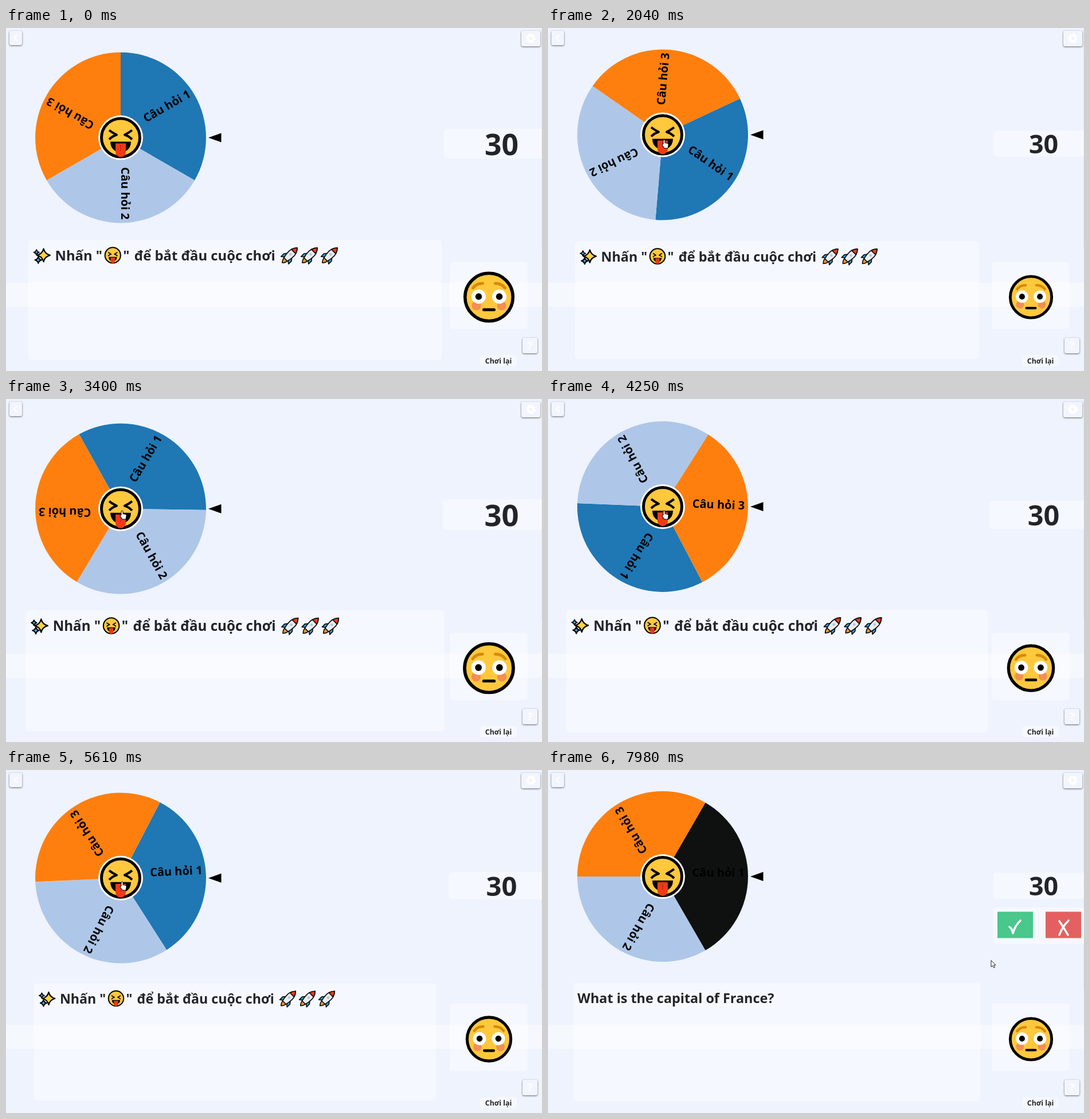
Recreate the animation shown at these times as an HTML page. Size 935 px wide and 599 px high, loop 8000 ms.

```html
<!DOCTYPE html>
<html lang="vi">
<head>
<meta charset="utf-8">
<title>Vòng quay câu hỏi</title>
<style>
  html, body { margin: 0; width: 100%; height: 100%; overflow: hidden; background: #eef3fe; }
  svg { display: block; width: 935px; height: 599px; }
  text { font-family: "Noto Sans", "Open Sans", sans-serif; font-weight: 700; fill: #212529; }
  .card { fill: #fff; fill-opacity: .42; }
  .button { fill: #f2f5fd; filter: drop-shadow(0 1px 1.5px rgba(0, 0, 0, .6)); }
  .label { font-size: 20px; fill: #000; text-anchor: end; }
  .line { fill: none; stroke-linecap: round; stroke-linejoin: round; }
</style>
</head>
<body>
<svg viewBox="0 0 935 599">
  <defs>
    <g id="laugh">
      <circle r="33.5" fill="#ffc83d" stroke="#000" stroke-width="5"/>
      <g class="line" stroke="#000" stroke-width="4" style="stroke-linecap:butt">
        <path d="M-20-13Q-15-9-7-5Q-14-3-20 3M20-13Q15-9 7-5Q14-3 20 3"/>
      </g>
      <path d="M-18 7H18Q18 19 8 24H-8Q-18 19-18 7Z"/>
      <path d="M-9 10H9V25A9 9 0 0 1-9 25Z" fill="#f03a17"/>
      <path d="M0 13V23" stroke="#c6280f" stroke-width="1.5"/>
    </g>

    <g id="flushed">
      <circle r="41.7" fill="#ffc83d" stroke="#000" stroke-width="5.6"/>
      <g fill="#f28f52"><circle cx="-22" cy="15" r="8"/><circle cx="22" cy="15" r="8"/></g>
      <g fill="#fff"><circle cx="-18" cy="-1" r="12.5"/><circle cx="18" cy="-1" r="12.5"/></g>
      <circle cx="-18" cy="-1" r="5.8"/><circle cx="18" cy="-1" r="5.8"/>
      <g class="line" stroke-width="5">
        <path d="M-28-16Q-22-24-11-24M28-16Q22-24 11-24" stroke="#d68a0c"/>
        <path d="M-9 22H9" stroke="#000"/>
      </g>
    </g>

    <path id="star" d="M0-10Q2-2 10 0Q2 2 0 10Q-2 2-10 0Q-2-2 0-10Z"
      stroke="#000" stroke-linejoin="round"/>
    <g id="sparkles">
      <use href="#star" transform="translate(3)scale(1.1)" fill="#ffd23f" stroke-width="2"/>
      <use href="#star" transform="translate(-9 -5)scale(.45)" fill="#3fb4f0" stroke-width="4"/>
      <use href="#star" transform="translate(-6 8)scale(.55)" fill="#3fb4f0" stroke-width="4"/>
    </g>

    <g id="rocket" transform="rotate(45)" stroke="#111" stroke-width="1.7" stroke-linejoin="round">
      <path d="M-4 9Q-4 14 0 18Q4 14 4 9Z" fill="#ff9d1c"/>
      <path d="M-4-1L-9 5V12L-4 8H4L9 12V5L4-1Z" fill="#2aa7e8"/>
      <path d="M0-18Q6-11 6-4Q6 4 4 10H-4Q-6 4-6-4Q-6-11 0-18Z" fill="#e9edf2"/>
      <path d="M0-18Q4-14 5.2-9H-5.2Q-4-14 0-18Z" fill="#f03a17"/>
      <circle cy="-2" r="2.2" fill="#b9c6d2" stroke="none"/>
    </g>
  </defs>

  <rect width="935" height="599" fill="#eef3fe"/>
  <rect y="445" width="935" height="42" fill="#f5f8fd"/>
  <rect x="934" width="1" height="384" fill="#dfe4ee"/>

  <g id="wheel">
    <g id="disc"></g>
    <circle r="39" fill="#fff"/>
    <use href="#laugh"/>
    <path d="M153 0L175.5-8V8Z"/>
  </g>

  <g id="counter">
    <rect class="card" x="-87" y="-22.5" width="174" height="45" rx="6"/>
    <text x=".5" y="17" font-size="44.6" text-anchor="middle">30</text>
  </g>

  <g id="answers">
    <rect class="card" x="776.5" y="240" width="175" height="63.5" rx="6"/>
    <rect x="784" y="247.5" width="62" height="46" fill="#49c78d"/>
    <rect x="868" y="247.5" width="62" height="46" fill="#e46060"/>
    <g class="line" stroke="#fff" stroke-width="3.6">
      <path d="M805 274Q809 276 811 285Q815 271 824 263"/>
      <path d="M892 264Q899 274 907 288M908 263Q897 274 892 288"/>
    </g>
  </g>

  <g id="panel">
    <rect class="card" x="-351" y="-102" width="702" height="204" rx="6"/>
    <g id="invite" font-size="23.2">
      <use href="#sparkles" x="-328" y="-76"/>
      <text x="-305.5" y="-67">Nhấn "</text>
      <use href="#laugh" transform="translate(-207.5 -76)scale(.395)"/>
      <text x="-190" y="-67">"</text>
      <text x="-171" y="-67">để bắt đầu cuộc chơi</text>
      <use href="#rocket" transform="translate(93 -76)"/>
      <use href="#rocket" transform="translate(127 -76)"/>
      <use href="#rocket" transform="translate(161 -76)"/>
    </g>
    <text id="question" x="-344" y="-67" font-size="23.1">What is the capital of France?</text>
  </g>

  <g id="mood">
    <rect class="card" x="774" y="408.5" width="136" height="117" rx="6"/>
    <use id="face" href="#flushed"/>
  </g>

  <rect class="button" x="6" y="5" width="22" height="25" rx="3"/>
  <path class="line" d="M19 13L14 17.5L19 22" stroke="#fff" stroke-width="2"/>
  <rect class="button" x="899" y="5" width="33" height="27" rx="3"/>
  <circle cx="915.5" cy="18" r="5" fill="none" stroke="#fff" stroke-width="4"/>
  <circle cx="915.5" cy="18" r="7.5" fill="none" stroke="#fff" stroke-width="2" stroke-dasharray="3 2.9"/>
  <rect class="button" x="901" y="541" width="26" height="27" rx="3"/>
  <text x="914" y="561" font-size="18" text-anchor="middle" style="fill:#fff">?</text>
  <rect class="card" x="827" y="571" width="64" height="20" rx="5"/>
  <text x="859" y="586" font-size="12.4" text-anchor="middle">Chơi lại</text>

  <g id="hand" transform="translate(201 195)" fill="#fff" stroke="#000" stroke-linejoin="round">
    <path d="M0 1Q1.5-1 3 1V5.5L8 6.5Q9.5 7 9 10L8 15H2L-2 9Q-2 7 0 8Z"/>
  </g>
  <g id="blocked" fill="#fff" stroke="#e0241b" stroke-width="1.6">
    <circle cx="200.5" cy="191" r="4.5"/><path d="M197.5 188L203.5 194"/>
  </g>
  <path id="arrow" d="M0 0V11.5L2.7 9L4.6 13L6.5 12L4.7 8.2H8Z" fill="#fff" stroke="#222"/>
</svg>

<script>
const LOOP = 8000, STEP = 170;
const LEAD = 10;                          // the closing pose shows just before the loop ends
const PERIOD = 3.11;                      // idle motions, seconds
const SPIN = { start: 0.907, length: 5.09, turn: 1470 };
const LEAVE = 5.96, RETURN = 6.96;        // panels slide out, then back in
const COLORS = ['#1f77b4', '#aec7e8', '#ff7f0e'];
const CHOSEN = '#0f1110';

const el = id => document.getElementById(id);
const clamp = x => Math.max(0, Math.min(1, x));
const place = (id, transform) => el(id).setAttribute('transform', transform);
const show = (id, on) => el(id).style.display = on ? '' : 'none';

el('disc').innerHTML = COLORS.map((color, i) => `
  <g transform="rotate(${i * 120 - 30})">
    <path d="M0 0L74.5-129A149 149 0 0 1 74.5 129Z" fill="${color}"/>
    <text class="label" x="143" y="-.5">Câu hỏi ${i + 1}</text>
  </g>`).join('');
const firstSector = el('disc').querySelector('path');

// CSS "ease": cubic-bezier(.25, .1, .25, 1)
function ease(x) {
  x = clamp(x);
  const curve = (s, a, b) => 3 * (1 - s) ** 2 * s * a + 3 * (1 - s) * s * s * b + s ** 3;
  let low = 0, high = 1;
  for (let i = 0; i < 20; i++) {
    const mid = (low + high) / 2;
    if (curve(mid, .25, .25) < x) low = mid; else high = mid;
  }
  return curve(low, .1, 1);
}

const cubicInOut = u => u < .5 ? 4 * u ** 3 : 1 - 4 * (1 - u) ** 3;
const wave = (t, peak) => .5 + .5 * Math.cos(2 * Math.PI * (t - peak) / PERIOD);

function pulse(t) {
  const phase = (.32 + 2 * t / PERIOD) % 2;
  return 1 + .05 * (phase < 1 ? ease(phase) : 1 - ease(phase - 1));
}

function draw(t) {
  const angle = SPIN.turn * cubicInOut(clamp((t - SPIN.start) / SPIN.length));
  const spun = t >= SPIN.start + SPIN.length;
  place('wheel', `translate(200 ${186 + 5.7 * wave(t, .2)})`);
  place('disc', `rotate(${angle})`);
  firstSector.setAttribute('fill', spun ? CHOSEN : COLORS[0]);

  const beat = 1 + .18 * wave(t, .35);
  place('counter', `translate(864 202) scale(${beat})`);
  place('face', `translate(842.5 470) scale(${beat / 1.157})`);

  const asking = t >= RETURN;
  const away = asking ? 1 - ease(t - RETURN) : ease(t - LEAVE);
  place('panel', `translate(399.5 ${475 + 209 * away}) scale(${pulse(t)})`);
  place('mood', `translate(${153 * away} 0)`);
  show('invite', !asking);
  show('question', asking);
  show('answers', asking);

  const move = cubicInOut(clamp((t - 6.8) / .9));
  place('arrow', `translate(${200 + 573 * move} ${191 + 141.5 * move})`);
  show('hand', t >= .6 && !spun);
  show('blocked', spun && t < 6.8);
  show('arrow', t >= 6.8);
}

function tick() {
  const ms = performance.now() % LOOP;
  draw(Math.floor((ms + LEAD) / STEP) * STEP / 1000);
  requestAnimationFrame(tick);
}
tick();
</script>
</body>
</html>
```
